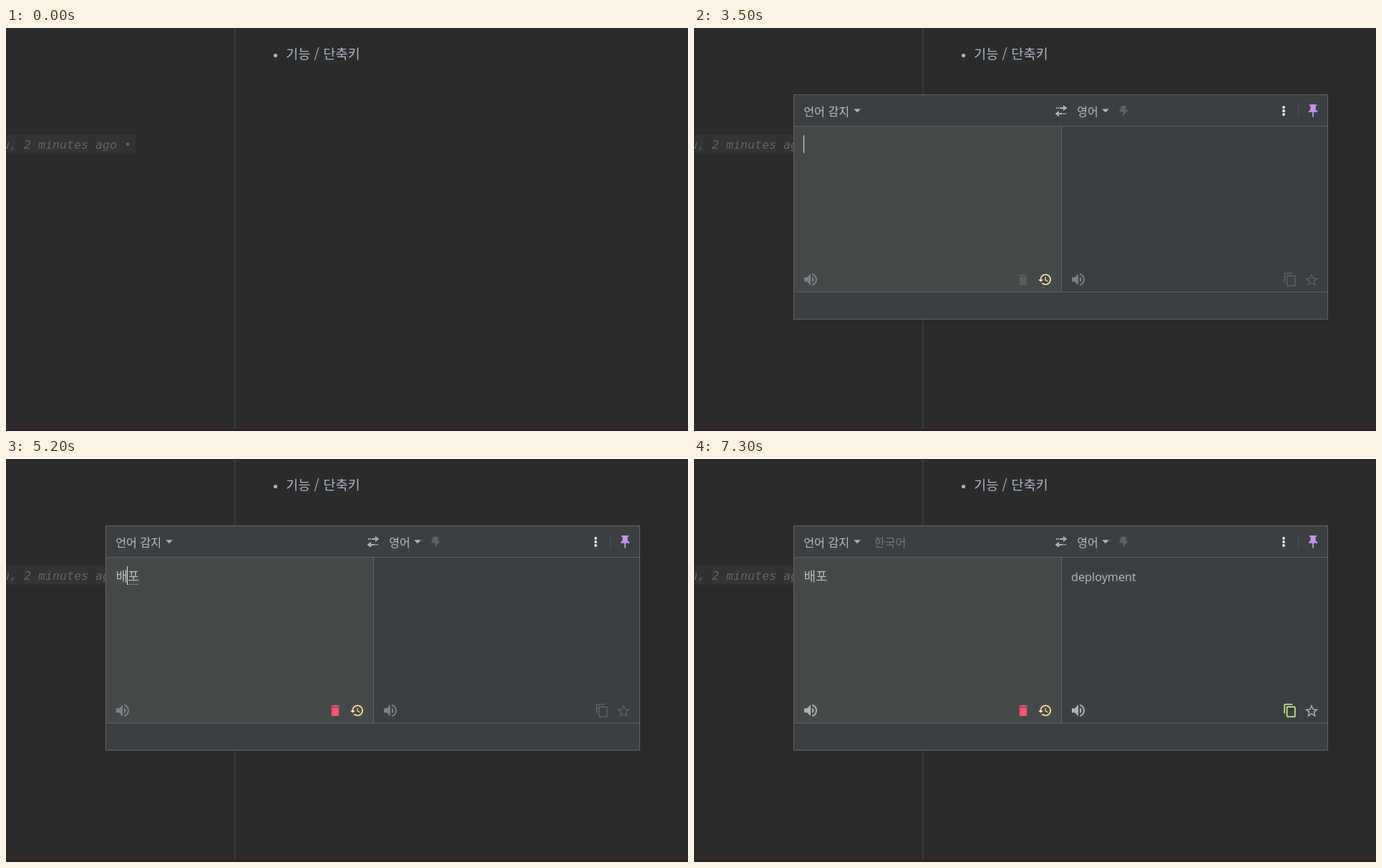
An HTML page for the animation above (7400 ms loop, 953x564 px).

```html
<!DOCTYPE html>
<html lang="ko">
<head>
<meta charset="utf-8">
<title>Translation popup</title>
<style>
html, body { margin: 0; width: 100%; height: 100%; overflow: hidden; background: #2b2b2b; }
svg { display: block; width: 953px; height: 564px; }
text { font-family: "Noto Sans CJK KR", "Noto Sans CJK", "Noto Sans", sans-serif; font-weight: 350; white-space: pre; }
.label { font-size: 16.1px; fill: #bbb; }
.input { font-size: 18px; fill: #bbb; }
.note { font: italic 400 16.62px "DejaVu Sans Mono", monospace; fill: #60666c; }
.result { font: 400 16.25px "Open Sans", "Noto Sans", sans-serif; fill: #bbb; }
</style>
</head>
<body>
<svg viewBox="0 0 953 564">
  <defs>
    <path id="speaker" d="M3 9v6h4l5 5V4L7 9H3zm13.5 3c0-1.77-1.02-3.29-2.5-4.03v8.05c1.48-.73 2.5-2.25 2.5-4.02zM14 3.23v2.06c2.89.86 5 3.54 5 6.71s-2.11 5.85-5 6.71v2.06c4.01-.91 7-4.49 7-8.77s-2.99-7.86-7-8.77z"/>
    <path id="triangle" d="M0 0h10l-5 5z"/>
  </defs>

  <!-- editor -->
  <rect width="953" height="564" fill="#2b2b2b"/>
  <rect y="149" width="181" height="27" fill="#323232"/>
  <text class="note" x="-5" y="169">u, 2 minutes ago •</text>
  <rect x="319" width="2" height="561" fill="#383a3b"/>
  <rect y="561" width="953" height="3" fill="#2a2326"/>
  <circle cx="376.5" cy="38.5" r="2.6" fill="#a9b7c6"/>
  <text x="391" y="42.5" font-size="18.7" fill="#a9b7c6">기능 / 단축키</text>

  <g id="popup">
    <rect x="139.5" y="93.5" width="746" height="314" fill="#3c3f41" stroke="#616566"/>
    <rect x="140" y="138" width="373" height="231" fill="#45494a"/>
    <path d="M140 137.5H885M140 369.5H885M513.5 138V369" stroke="#5d6163"/>

    <!-- header -->
    <text class="label" x="153.3" y="122.5">언어 감지</text>
    <use href="#triangle" x="223" y="113.3" fill="#afb1b3"/>
    <text class="label" id="detected" x="251.8" y="122.5" style="fill:#777a7b">한국어</text>
    <g fill="#afb1b3">
      <path d="M506 111h1.5v2h-1.5zM508.5 111h1.5v2h-1.5zM511 111h5v-3l5.5 4-5.5 4v-3h-5z"/>
      <path d="M520 119h-1.5v2h1.5zM517.5 119h-1.5v2h1.5zM515 119h-5v-3l-5.5 4 5.5 4v-3h5z"/>
    </g>
    <text class="label" x="535.3" y="122.5">영어</text>
    <use href="#triangle" x="570" y="113.3" fill="#afb1b3"/>
    <path d="M597 109h7.5l-2 5.5h4.5l-8.5 10 1.5-7h-6z" fill="#5e6163"/>
    <g fill="#f2f3f4">
      <circle cx="824" cy="111" r="1.9"/><circle cx="824" cy="116" r="1.9"/><circle cx="824" cy="121" r="1.9"/>
    </g>
    <path d="M844.5 107V124" stroke="#515557"/>
    <path transform="translate(854.2 105.2) scale(.9)" fill="#c792ea" d="M16 9V4h1c.55 0 1-.45 1-1s-.45-1-1-1H7c-.55 0-1 .45-1 1s.45 1 1 1h1v5c0 1.66-1.34 3-3 3v2h5.97v7l1 1 1-1v-7H19v-2c-1.66 0-3-1.34-3-3z"/>

    <!-- text panes -->
    <text class="input" id="typed" x="153.5" y="171"></text>
    <path id="underline" stroke="#bbb" stroke-dasharray="1 1"/>
    <rect id="caret" y="150" width="1" height="25" fill="#e6e6e6"/>
    <text class="result" id="result" x="527" y="171">deployment</text>

    <!-- tool icons -->
    <g id="speakers">
      <use href="#speaker" x="151" y="340"/>
      <use href="#speaker" x="525" y="340"/>
    </g>
    <path id="trash" transform="translate(449.8 342) scale(.85)" d="M6 19c0 1.1.9 2 2 2h8c1.1 0 2-.9 2-2V7H6v12zM19 4h-3.5l-1-1h-5l-1 1H5v2h14V4z"/>
    <path transform="translate(480.1 341.7) scale(.86)" fill="#ffe6a3" d="M13 3c-4.97 0-9 4.03-9 9H1l3.89 3.89.07.14L9 12H6c0-3.87 3.13-7 7-7s7 3.13 7 7-3.13 7-7 7c-1.93 0-3.68-.79-4.94-2.06l-1.42 1.42C8.27 19.99 10.51 21 13 21c4.97 0 9-4.03 9-9s-4.03-9-9-9zm-1 5v5l4.28 2.54.72-1.21-3.5-2.08V8H12z"/>
    <path id="copy" transform="translate(822.6 341.7) scale(.86)" d="M16 1H4c-1.1 0-2 .9-2 2v14h2V3h12V1zm3 4H8c-1.1 0-2 .9-2 2v14c0 1.1.9 2 2 2h11c1.1 0 2-.9 2-2V7c0-1.1-.9-2-2-2zm0 16H8V7h11v14z"/>
    <path id="star" transform="translate(852 341.7) scale(.92)" d="M22 9.24l-7.19-.62L12 2 9.19 8.63 2 9.24l5.46 4.73L5.82 21 12 17.27 18.18 21l-1.63-7.03L22 9.24zM12 15.4l-3.76 2.27 1-4.28-3.32-2.88 4.38-.38L12 6.1l1.71 4.04 4.38.38-3.32 2.88 1 4.28L12 15.4z"/>
  </g>
</svg>
<script>
const LOOP = 7400, OPEN = 1700, TRANSLATED = 5600, STARRED = 5800;
const CELL = 16.5;

// [time, committed text, syllable being composed]
const keys = [
  [0, '', ''],
  [3700, '', 'ㅂ'], [3800, '', '뱌'], [3900, '', '\uBC66'],
  [4000, '', '뱌'], [4200, '', 'ㅂ'], [4400, '', '배'], [4500, '배', 'ㅗ'],
  [4700, '배', ''], [4800, '', ''],
  [5000, '', '배'], [5100, '', '\uBC4A'], [5200, '배', '포'],
  [7300, '배포', '']
];
const caretOn = [[1700, 2200], [2600, 3100], [3500, 5600], [6100, 6500], [7000, 7300]];

const el = Object.fromEntries([...document.querySelectorAll('[id]')].map(n => [n.id, n]));
const show = (node, on) => node.setAttribute('visibility', on ? 'inherit' : 'hidden');
const paint = (node, color) => node.setAttribute('fill', color);

function draw(t) {
  const [, done, composing] = keys.filter(k => k[0] <= t).pop();
  const text = done + composing;
  const x = 153 + Math.floor(done.length * CELL);
  const translated = t >= TRANSLATED;

  show(el.popup, t >= OPEN);
  if (el.typed.textContent !== text) el.typed.textContent = text;
  el.underline.setAttribute('d', `M${x + 1} 175.5h16`);
  show(el.underline, composing);
  el.caret.setAttribute('x', x);
  el.caret.setAttribute('height', composing ? 26 : 25);
  show(el.caret, caretOn.some(([a, b]) => t >= a && t < b));
  show(el.detected, translated);
  show(el.result, translated);
  paint(el.speakers, translated ? '#afb1b3' : '#7d8082');
  paint(el.trash, text ? '#ff5370' : '#5c5f61');
  paint(el.copy, translated ? '#c3e88d' : '#5c5f61');
  paint(el.star, t >= STARRED ? '#afb1b3' : '#5c5f61');
}

const start = performance.now();
function tick() {
  draw((performance.now() - start) % LOOP);
  requestAnimationFrame(tick);
}
tick();
</script>
</body>
</html>
```
